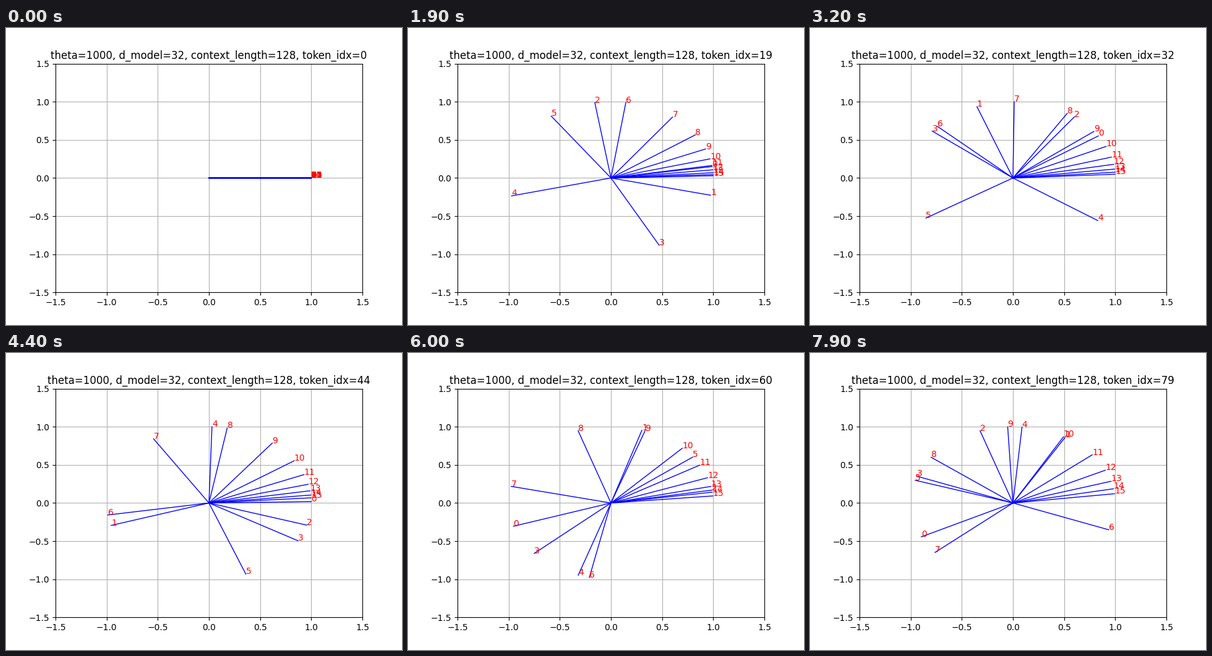
Animation, 640 px wide and 480 px high, one loop 8 s. Source, as a matplotlib script:

```python
import matplotlib.pyplot as plt
import numpy as np
from matplotlib.animation import FuncAnimation

THETA = 1000
D_MODEL = 32
CONTEXT_LENGTH = 128
FRAMES = 80
INTERVAL = 100

# Rotary frequencies: one per pair of embedding dimensions
freqs = THETA ** (-2 * np.arange(D_MODEL // 2) / D_MODEL)

fig, ax = plt.subplots(figsize=(6.4, 4.8), dpi=100)
ax.set_xlim(-1.5, 1.5)
ax.set_ylim(-1.5, 1.5)
ax.grid(True)
title = ax.set_title("")

spokes = [ax.plot([], [], color="blue", lw=1, snap=False)[0] for _ in freqs]
labels = [ax.text(0, 0, str(i), color="red") for i in range(len(freqs))]


def update(token):
    angles = token * freqs
    for spoke, label, x, y in zip(spokes, labels, np.cos(angles), np.sin(angles)):
        spoke.set_data([0, x], [0, y])
        label.set_position((x, y))
    title.set_text(
        f"theta={THETA}, d_model={D_MODEL}, "
        f"context_length={CONTEXT_LENGTH}, token_idx={token}"
    )
    return [*spokes, *labels, title]


anim = FuncAnimation(fig, update, frames=FRAMES, interval=INTERVAL,
                     repeat=True, repeat_delay=0, blit=False)
plt.show()
```
